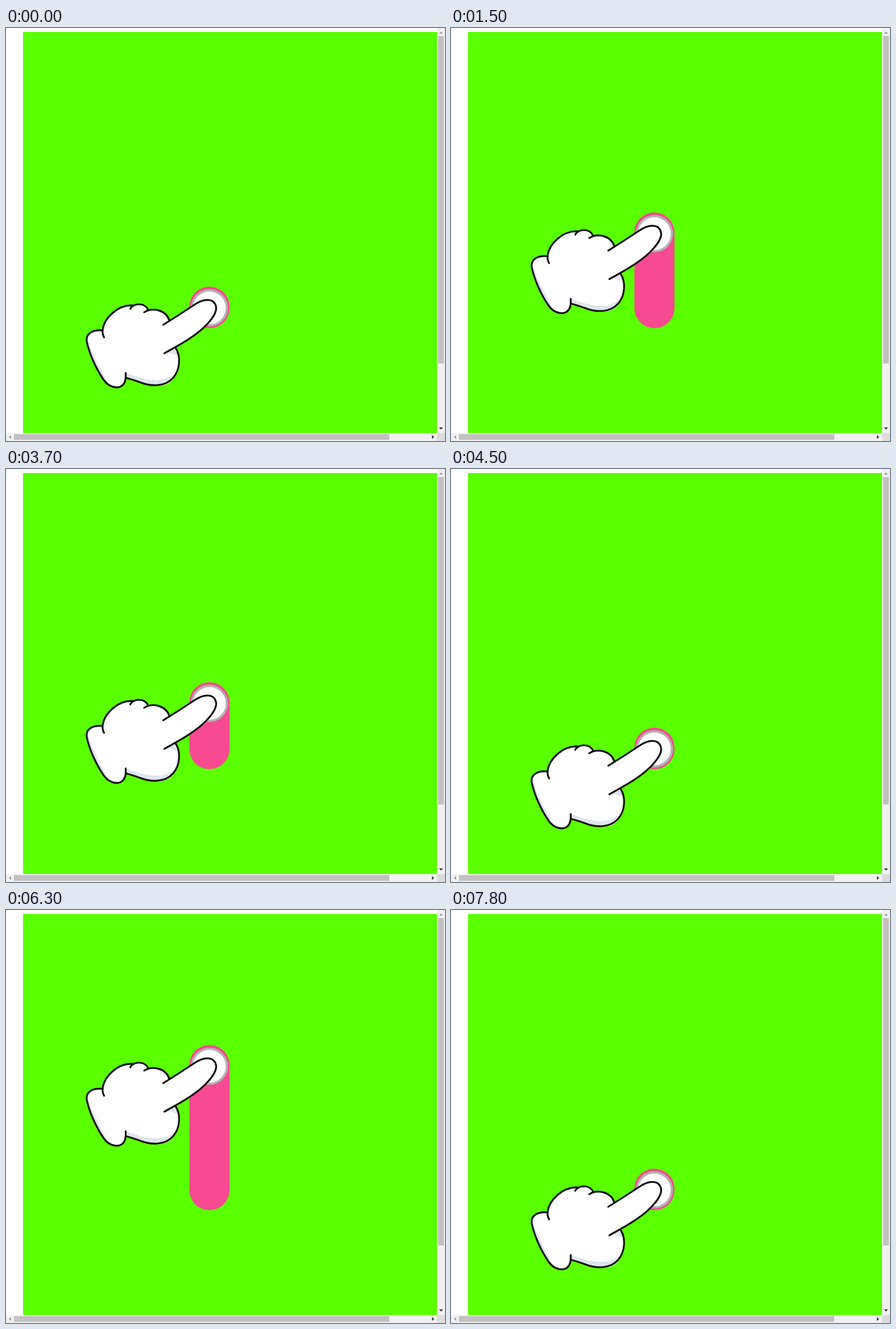
Animation of 772 by 725 pixels, one loop 8 s. Source, as an HTML page with a canvas:

```html
<!DOCTYPE html>
<html lang="en">
<head>
<meta charset="utf-8">
<title>Slider hand</title>
<style>
html, body { margin: 0; width: 100%; height: 100%; overflow: hidden; background: #fff; }
canvas { display: block; }
</style>
</head>
<body>
<canvas id="stage" width="772" height="725"></canvas>
<script>
const ctx = document.getElementById("stage").getContext("2d");

const LOOP = 8000, STEP = 100;
const RISE = 217, SETTLE = 330, RESET = 760;
const starts = [330, 1434, 2550, 3667, 4784, 5913, 7030];

const palm = new Path2D(
  "M170 531 C171 512 194 487 222 487 C229 482 244 483 250 495 C264 492 281 495 287 514 " +
  "L298 562 C307 575 307 599 294 614 C279 631 254 630 236 623 Q222 618 211 614 L172 543 Z");
const cuff = new Path2D(
  "M170 531 C153 529 140 536 142 550 C146 570 157 596 172 618 C182 632 197 633 204 628 " +
  "C210 623 211 616 210.500 606 L215 560 L172 543 Z");
const finger = new Path2D(
  "M276.500 521 Q304 504 331 486 C350 473 367 475 369.500 490 C371 501 358 517 342 531 " +
  "C324 546 302 558 278.500 571 L262 548 Z");
const shades = [
  "M211 606 C228 611 244 618 264 618 C280 618 291 612 301 603 C292 631 267 632 240 623 L211 614 Z",
  "M281 570 L298 562 Q303 569 304 577 Q296 571 281 570 Z",
  "M143 545 C151 570 163 592 181 626 C163 609 148 577 143 545 Z"
].map(d => new Path2D(d));
const lines = [
  "M172.500 543 Q169 537 170 529 C173 510 195 486 223 487",
  "M218.500 493 C223 483 244 481 250 495",
  "M243 499 C257 490 281 494 287.500 514",
  "M170 531 C153 529 140 536 142 550 C146 570 157 596 172 618 C182 632 197 633 204 628 C210 623 211 616 210.500 605.500",
  "M211 614 Q222 617 236 622 C254 629 279 631 294 614 C307 599 307 575 298.500 562",
  "M276.500 521 Q304 504 331 486 C350 473 367 475 369.500 490 C371 501 358 517 342 531 C324 546 302 558 278.500 571"
].map(d => new Path2D(d));

function rect(color, x, y, w, h) {
  ctx.fillStyle = color;
  ctx.fillRect(x, y, w, h);
}

function disc(color, x, y, r) {
  ctx.fillStyle = color;
  ctx.beginPath();
  ctx.arc(x, y, r, 0, Math.PI * 2);
  ctx.fill();
}

function arrow(color, x, y, dx, dy) {
  ctx.fillStyle = color;
  ctx.beginPath();
  ctx.moveTo(x + dx * 2, y + dy * 2);
  ctx.lineTo(x - dx * 2 + dy * 3.5, y - dy * 2 + dx * 3.5);
  ctx.lineTo(x - dx * 2 - dy * 3.5, y - dy * 2 - dx * 3.5);
  ctx.fill();
}

function drawPage() {
  rect("#fff", 0, 0, 772, 725);
  rect("#5aff00", 30, 7, 728, 704);
  rect("#f1f1f1", 758, 0, 14, 711);
  rect("#f1f1f1", 0, 711, 758, 14);
  rect("#dcdcdc", 758, 711, 14, 14);
  rect("#c1c1c1", 760, 14, 10, 575);
  rect("#c1c1c1", 14, 713, 660, 10);
  arrow("#a3a3a3", 765, 8, 0, -1);
  arrow("#404040", 765, 703, 0, 1);
  arrow("#a3a3a3", 7, 718, -1, 0);
  arrow("#404040", 751, 718, 1, 0);
}

function drawSlider(lift) {
  ctx.fillStyle = "#f74a91";
  ctx.beginPath();
  ctx.roundRect(322.5, 454 - lift, 70.5, 73 + lift, 35.25);
  ctx.fill();
  disc("#b3b3b3", 357.7, 491.3 - lift, 32.7);
  disc("#fff", 357.7, 491.3 - lift, 28.8);
}

function drawHand(lift) {
  ctx.save();
  ctx.translate(0, -lift);
  ctx.fillStyle = "#fff";
  for (const p of [palm, cuff]) ctx.fill(p);
  ctx.fillStyle = "#dfe5ec";
  for (const p of shades) ctx.fill(p);
  ctx.fillStyle = "#fff";
  ctx.fill(finger);
  ctx.strokeStyle = "#111";
  ctx.lineWidth = 3.2;
  ctx.lineCap = ctx.lineJoin = "round";
  for (const p of lines) ctx.stroke(p);
  ctx.restore();
}

// Exponential ease-out, a pause at the top, then a hard reset.
function liftAt(t) {
  const start = starts.findLast(s => s <= t);
  if (start === undefined) return 0;
  const age = t - start;
  if (age >= RESET) return 0;
  return age >= SETTLE ? RISE : RISE * (1 - Math.exp(-age / 72));
}

function draw(now) {
  const t = Math.floor((now % LOOP) / STEP) * STEP;
  const lift = liftAt(t);
  drawPage();
  drawSlider(lift);
  drawHand(lift);
}

let origin;
function tick(now) {
  origin ??= now;
  draw(now - origin);
  requestAnimationFrame(tick);
}
draw(0);
requestAnimationFrame(tick);
</script>
</body>
</html>
```
